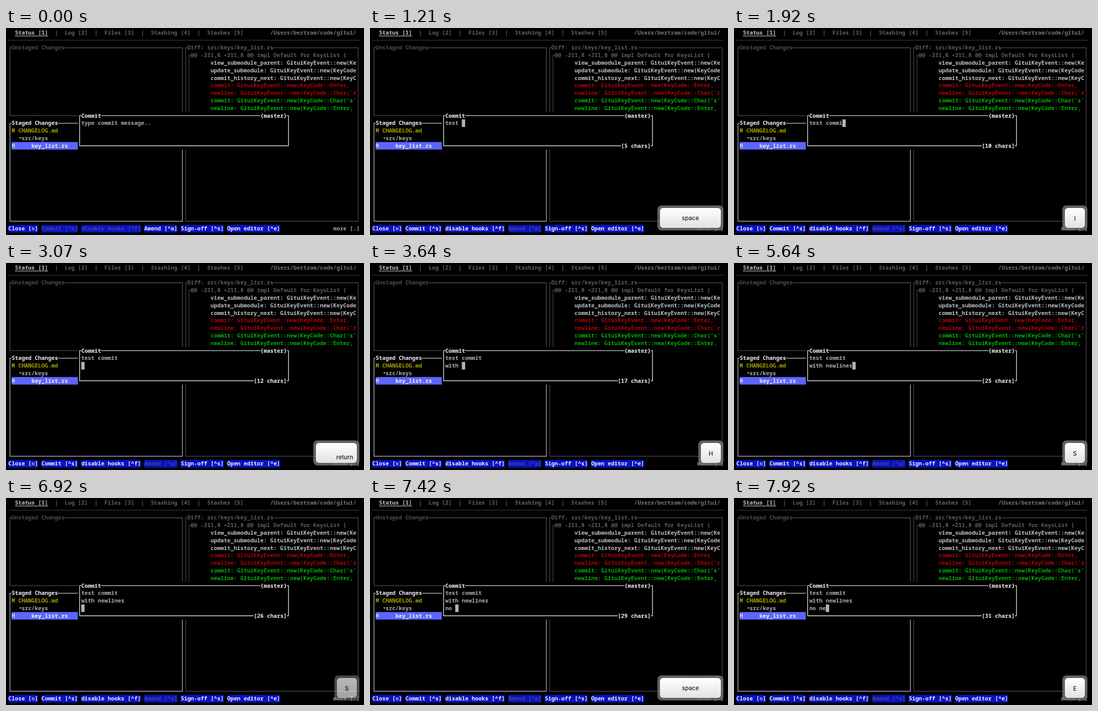
Write an HTML page that moves like this. It is 700 px wide and 406 px high and loops after 7990 ms.

```html
<!DOCTYPE html>
<html lang="en">
<head>
<meta charset="utf-8">
<title>Commit dialog</title>
<style>
html, body { margin: 0; width: 100%; height: 100%; overflow: hidden; background: #000; }
svg { display: block; width: 700px; height: 406px; }
text { font: 600 10.807px "Noto Sans Mono", "DejaVu Sans Mono", monospace; white-space: pre; }
text.b { font-weight: 700; }
text.key { font: 500 11.5px Inter, "Open Sans", sans-serif; fill: #222; }
</style>
</head>
<body>
<svg id="stage" viewBox="0 0 700 406"></svg>
<script>
const LOOP = 7990, CW = 6.484, CH = 14.79;
const DIM = '#4c4c4c', WHITE = '#f0f0f0', GRAY = '#acacac', BLUE = '#0812c4';
const stage = document.getElementById('stage');

// Terminal grid: left edge of a column, middle of a row.
const X = c => 4.5 + c * CW;
const Y = r => 9.2 + r * CH;

const rect = (x, y, w, h, fill, more = '') =>
  `<rect x="${x}" y="${y}" width="${w}" height="${h}" fill="${fill}" ${more}/>`;
const cells = (c, r, w, h, fill) => rect(X(c), Y(r) - CH / 2, w * CW, h * CH, fill);
const text = (c, r, s, fill, bold) =>
  `<text x="${X(c)}" y="${Y(r) + 3.7}" fill="${fill}"${bold ? ' class="b"' : ''}>${s}</text>`;
const title = (c, r, s, fill) => cells(c, r, s.length, 1, '#000') + text(c, r, s, fill, true);
const path = (d, stroke) => `<path d="${d}" fill="none" stroke="${stroke}" stroke-width="1.4"/>`;
const frame = (c1, r1, c2, r2, stroke) =>
  path(`M${X(c1 + .5)} ${Y(r1)}H${X(c2 + .5)}V${Y(r2)}H${X(c1 + .5)}Z`, stroke);

function command(c, s, enabled) {
  return cells(c, 26, s.length, 1, BLUE) + text(c, 26, s, enabled ? WHITE : '#45498a', true);
}

const DIFF = [
  ['view_submodule_parent: GituiKeyEvent::new(Ke', '#bebebe'],
  ['update_submodule: GituiKeyEvent::new(KeyCode', '#bebebe'],
  ['commit_history_next: GituiKeyEvent::new(KeyC', '#bebebe'],
  ['commit: GituiKeyEvent::new(KeyCode::Enter,', '#b00404'],
  ["newline: GituiKeyEvent::new(KeyCode::Char('r", '#b00404'],
  ["commit: GituiKeyEvent::new(KeyCode::Char('s'", '#04b004'],
  ['newline: GituiKeyEvent::new(KeyCode::Enter,', '#04b004']
];

const backdrop = [
  text(2, 0, 'Status [1]', '#c4c4c4', true),
  path(`M${X(2)} 15.6H${X(12)}`, '#b8b8b8'),
  text(14, 0, '|  Log [2]  |  Files [3]  |  Stashing [4]  |  Stashes [5]', '#606060'),
  text(79, 0, '/Users/bertram/code/gitui/', '#747474'),
  path(`M${X(0)} ${Y(1)}H${X(106)}`, '#2c2c2c'),

  frame(0, 2, 52, 11, DIM),
  title(1, 2, 'Unstaged Changes', DIM),

  frame(53, 2, 105, 25, '#444'),
  title(54, 2, 'Diff: src/keys/key_list.rs', '#5c5c5c'),
  path(`M${X(55)} ${Y(3)}H${X(54.5)}V${Y(11)}`, '#3c3c3c'),
  text(55, 3, '@@ -211,8 +211,8 @@ impl Default for KeysList {', '#5c5c5c', true),
  ...DIFF.map(([s, fill], i) => text(61, 4 + i, s, fill, true)),

  frame(0, 12, 52, 25, '#a8a8a8'),
  title(1, 12, 'Staged Changes', WHITE),
  text(1, 13, 'M CHANGELOG.md', '#a4a400'),
  `<path d="M26 214.5h4.4l-2.2 3.6z" fill="${GRAY}"/>`,
  text(4, 14, 'src/keys', GRAY),
  cells(1, 15, 20, 1, '#5c66ff'),
  text(1, 15, 'M', '#c8ccff'),
  text(7, 15, 'key_list.rs', WHITE),

  cells(21, 11, 64, 5, '#000'),
  frame(21, 11, 84, 15, '#dcdcdc'),
  title(22, 11, 'Commit', WHITE),
  title(76, 11, '{master}', WHITE),

  command(0, 'Close [ ]', true),
  text(7, 26, '⎋', WHITE),
  command(52, 'Sign-off [^s]', true),
  command(66, 'Open editor [^e]', true),
  text(98, 26, 'more [.]', '#a0a0a0')
].join('');

// Typing: [time, characters, delay until the key cap shows].
const TYPED = [
  [710, 't'], [780, 'es'], [850, 't'], [990, ' '],
  [1420, 'c'], [1560, 'o'], [1640, 'm'], [1780, 'm'], [1850, 'i'], [1990, 't'],
  [3070, '\n'], [3210, 'w'], [3350, 'i'], [3420, 't'], [3570, 'h'], [3640, ' ', 70],
  [3920, 'n'], [4210, 'e'], [4350, 'w'],
  [4850, 'l'], [4920, 'i'], [5060, 'n'], [5200, 'e'], [5640, 's'],
  [6920, '\n', 70], [7060, 'n'], [7210, 'o'], [7350, ' '], [7640, 'n'], [7850, 'e']
];

function editor(message) {
  if (!message) return text(22, 12, 'type commit message..', GRAY);
  const lines = message.split('\n'), last = lines.length - 1;
  const count = `[${message.length} chars]`;
  return lines.map((s, i) => text(22, 12 + i, s, GRAY)).join('') +
    cells(22 + lines[last].length, 12 + last, 1, 1, '#b4b4b4') +
    title(84 - count.length, 15, count, WHITE);
}

function keyCap(char, alpha) {
  const wide = { ' ': ['space', 129], '\n': ['return', 90] }[char];
  const [label, w] = wide || [char.toUpperCase(), 49];
  const x = 691 - w;
  const pos = char === '\n' ? 'x="679" y="385" text-anchor="end"'
    : `x="${x + w / 2}" y="${char === ' ' ? 376.5 : 377.5}" text-anchor="middle"`;
  return `<g opacity="${alpha}">` +
    rect(x, 348, w, 49, '#727272', 'rx="8" fill-opacity=".85"') +
    rect(x + 5, 353, w - 10, 39, 'url(#cap)', 'rx="6"') +
    `<text class="key" ${pos}>${label}</text></g>`;
}

const defs = `<defs><linearGradient id="cap" x2="0" y2="1">
  <stop stop-color="#fff"/><stop offset="1" stop-color="#e2e2e2"/></linearGradient></defs>`;

function view(t) {
  const message = TYPED.filter(k => k[0] <= t).map(k => k[1]).join('');
  const shown = TYPED.filter(([at, , delay = 0]) => at + delay <= t).pop();
  const fading = t >= 6920 && t < 6990;
  return defs + backdrop +
    command(10, 'Commit [^s]', message) +
    command(22, 'disable hooks [^f]', message) +
    command(41, 'Amend [^a]', !message) +
    editor(message) +
    (shown ? keyCap(shown[1].slice(-1), fading ? .72 : 1) : '');
}

const start = performance.now();
let current = '';
function tick() {
  const next = view((performance.now() - start) % LOOP);
  if (next !== current) stage.innerHTML = current = next;
  requestAnimationFrame(tick);
}
tick();
</script>
</body>
</html>
```
